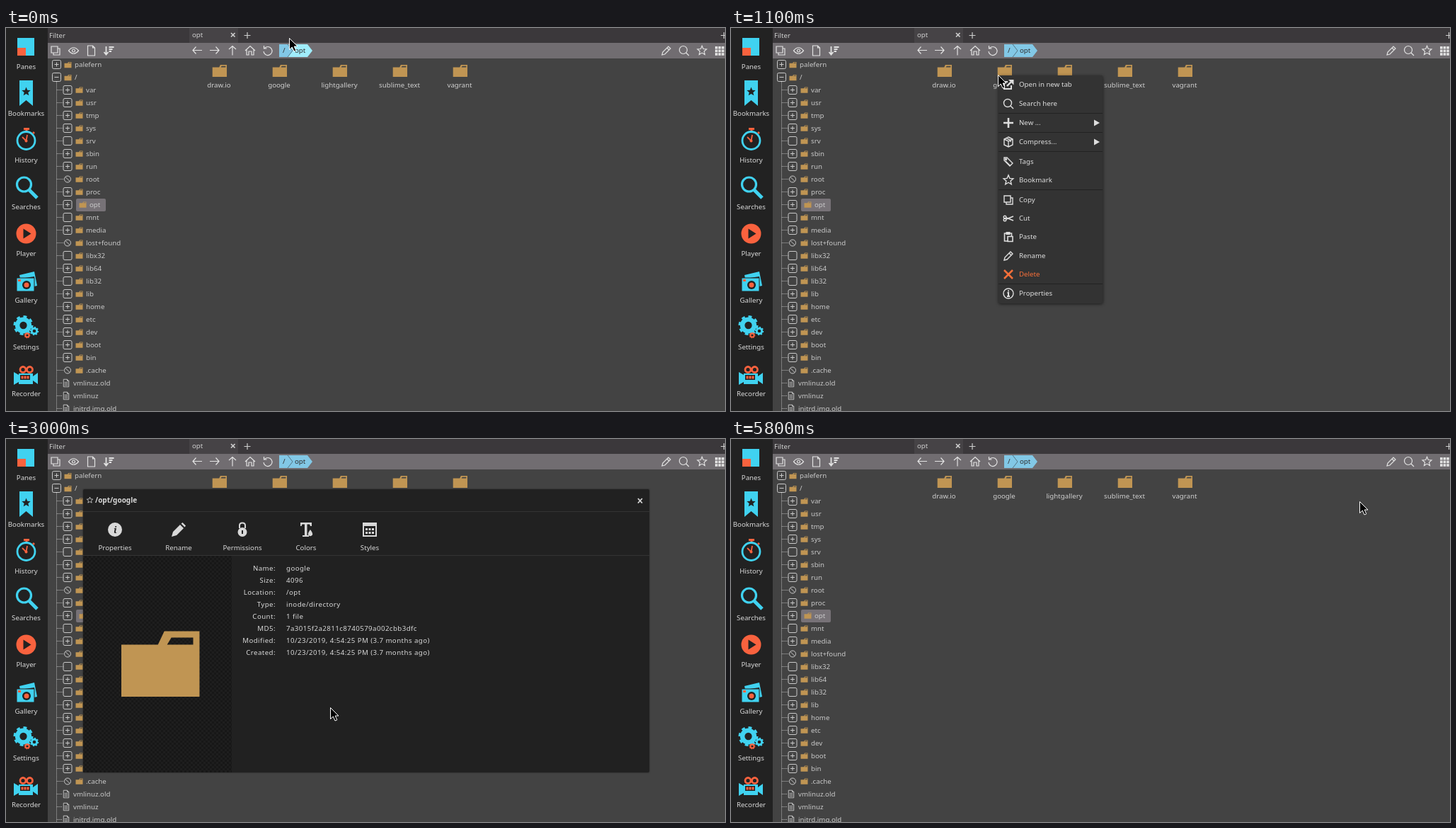
An HTML page for the animation above (6.4 s loop, 1016 by 541 pixels).

```html
<!DOCTYPE html>
<html lang="en">
<head>
<meta charset="utf-8">
<title>File manager</title>
<style>
html, body { margin: 0; width: 100%; height: 100%; overflow: hidden; background: #434343; }
svg { display: block; }
text { font: 9.7px "Noto Sans", "Open Sans", sans-serif; fill: currentColor; }
.mid { text-anchor: middle; }
.end { text-anchor: end; }
.wide text { letter-spacing: .43px; }
.ln { fill: none; stroke: currentColor; stroke-width: 1.2; }
.thin { stroke-width: 1; }
.solid { fill: currentColor; }
.row { color: #dedede; }
.row rect.bg { fill: none; }
.row.on { color: #fff; }
.row.on rect.bg { fill: #3c3c3c; }
.row.del { color: #f9703a; }
#menu .ln { stroke-width: 1.4; }
#sub { color: #d4d4d4; fill: #353535; }
#sub.on { color: #fff; fill: #3a3a3a; }
</style>
</head>
<body>
<svg id="stage" width="1016" height="541" viewBox="0 0 1016 541"></svg>
<script>
const BLUE = '#40d2f0', RED = '#f9623e', GOLD = '#c09553', DARK = '#222';

const text = (x, y, s, attr = '') => `<text x="${x}" y="${y}" ${attr}>${s}</text>`;
const mid = (x, y, s) => text(x, y, s, 'class="mid"');
const rect = (x, y, w, h, fill, attr = '') =>
  `<rect x="${x}" y="${y}" width="${w}" height="${h}" ${fill ? `fill="${fill}"` : ''} ${attr}/>`;
const circle = (x, y, r, attr) => `<circle cx="${x}" cy="${y}" r="${r}" ${attr}/>`;
const path = (d, attr = 'class="ln"') => `<path d="${d}" ${attr}/>`;
const at = (x, y, body, scale = 1) => `<g transform="translate(${x} ${y}) scale(${scale})">${body}</g>`;
const group = (attr, ...parts) => `<g ${attr}>${parts.join('')}</g>`;

const star = r => 'M' + Array.from({length: 10}, (_, i) => {
  const a = i * Math.PI / 5, q = i % 2 ? r * .45 : r;
  return `${(q * Math.sin(a)).toFixed(2)} ${(-q * Math.cos(a)).toFixed(2)}`;
}).join('L') + 'Z';

const gear = (x, y, r, color) =>
  circle(x, y, r * .62, `fill="none" stroke="${color}" stroke-width="${r * .48}"`) +
  circle(x, y, r * .9, `fill="none" stroke="${color}" stroke-width="${r * .28}" pathLength="16" stroke-dasharray="1"`);

const folder = (x, y, scale) => at(x, y,
  path('M0 19H52L61 0H111V93H0ZM71 9L65 19H102V9Z', `fill="${GOLD}" fill-rule="evenodd"`), scale);

const solid = 'class="solid"', thin = 'class="ln thin"';
const icons = {
  open: path('M-1-4H-6V6H4V1', 'class="ln" style="stroke-width:2"') +
    path('M-2 2L5-5', 'class="ln" style="stroke-width:2.4"') + path('M0-7H7.500V.5Z', solid),
  search: circle(-1, -1, 5.5, 'class="ln"') + path('M3 3L7 7'),
  plus: path('M-7 0H7M0-7V7', 'class="ln" style="stroke-width:2.6"'),
  cube: path('M0-7L6-4V4L0 7L-6 4V-4ZM-6-4L0-1L6-4M0-1V7M-3-5.5L3-2.5V0'),
  tag: path('M-6-6H-2L6 2L2 6L-6-2ZM-4-1L3 6') + circle(-3.5, -3.5, 1, 'class="ln"'),
  star: path(star(7.2)),
  copy: path('M-6-6H3V3H-6ZM-3 3V6H6V-3H3'),
  cut: path('M-3-1L7 3M-3 1L7-3', 'class="ln" style="stroke-width:1.8"') +
    circle(-5, -2, 1.8, 'class="ln"') + circle(-5, 2, 1.8, 'class="ln"'),
  paste: path('M0 6H-5.500V-5H4.500V-1M-1-.5H6V6.500H-1Z', 'class="ln" style="stroke-width:1.6"') + rect(-3.5, -7, 6, 4, '', solid),
  pencil: path('M-6 6L-5 2L3-6L6-3L-2 5ZM1-4L4-1'),
  cross: path('M-6-6L6 6M6-6L-6 6', 'class="ln" style="stroke-width:2.5"'),
  info: circle(0, 0, 7, 'class="ln"') + path('M-1.500-1H0V4M-2 4H2M0-4.500V-2.800', 'class="ln" style="stroke-width:2"'),
  arrow: path('M7 0H-6M-1.500-5L-6 0L-1.500 5'),
  eye: path('M-7 0Q0-8.500 7 0Q0 8.500-7 0Z') + circle(0, 0, 2, 'class="ln"'),
  page: path('M-5-7H2L5-4V7H-5ZM2-7V-4H5'),
  sort: path('M-4-6V5M-7 2L-4 5.500L-1 2M0-5H7M0-2H5M0 1H3.500', 'class="ln" style="stroke-width:1.8"'),
  home: path('M-7 0L0-6.500L7 0M-5-1.500V6H-2V1H2V6H5V-1.500'),
  reload: path('M-4.500-3.500A6 6 0 1 1-6 1M-5.500-7V-3H-1.500'),
  grid: [0, 1, 2, 3, 4, 5, 6, 7, 8].map(i => rect(-6 + i % 3 * 4.6, -6 + (i / 3 | 0) * 4.6, 3.6, 3.6, '', solid)).join('')
};
const icon = (name, x, y, scale) => at(x, y, icons[name], scale);

function sidebar() {
  const labels = ['Panes', 'Bookmarks', 'History', 'Searches', 'Player', 'Gallery', 'Settings', 'Recorder'];
  const b = `fill="${BLUE}"`, r = `fill="${RED}"`;
  const line = (color, w) => `fill="none" stroke="${color}" stroke-width="${w}"`;
  return rect(0, 0, 59, 541, DARK) + group('color="#dadada"',
    ...labels.map((s, i) => mid(28.5, 58 + 66 * i, s)),
    rect(16, 14, 24, 14, BLUE), rect(16, 28, 12, 11, RED), rect(28, 28, 12, 11, BLUE),
    path('M19 74H38V110L28.500 102L19 110Z', b), at(28.5, 90, path(star(6.5), `fill="${DARK}"`)),
    rect(25, 141, 8, 3, RED), rect(27.5, 143, 3, 3, RED), path('M38 147L40 149', line(RED, 2.5)),
    circle(28.5, 159, 12.5, line(BLUE, 2.8)), path('M23 154L28.500 159.500L30 151', line(RED, 1.8)), circle(28.5, 159.5, 2, r),
    circle(25.5, 221, 10, `fill="${DARK}" stroke="${BLUE}" stroke-width="3.200"`), path('M33 229L44 240', line(BLUE, 5)),
    circle(28.5, 290.5, 14, r), path('M24.500 283.500L35.500 290.500L24.500 297.500Z', `fill="${DARK}"`),
    path('M19 349L40 344L44 364L40 365V351L20 354Z', b),
    rect(15, 353, 25, 19, BLUE, `stroke="${DARK}"`),
    circle(29, 363, 6, `fill="${DARK}"`), circle(29, 363, 3.5, r), rect(17, 355, 4, 3, RED),
    gear(24.5, 420, 13.5, BLUE), gear(40, 428, 6, BLUE), gear(30, 434, 4.2, RED),
    circle(24, 482.5, 4, line(RED, 2.8)), circle(33.5, 482.5, 4, line(RED, 2.8)),
    rect(18, 488, 20, 15, BLUE), path('M11 486L18 490V500L11 504ZM38 492L45 487V503L38 498Z', b),
    rect(20, 490, 14, 7, DARK), ...[21.5, 25.5, 29.5].map(x => rect(x, 491.5, 3, 4, RED)));
}

function bars() {
  return rect(59, 0, 957, 21, '#3b383b') + rect(259, 0, 69, 21, '#464346') + rect(59, 21, 957, 22, '#716d71') +
    group('color="#cecece"',
      text(61, 14, 'Filter'), text(263, 13, 'opt'),
      path('M318 7L323.500 12.500M323.500 7L318 12.500', 'class="ln" style="stroke-width:1.700"'),
      path('M336.500 10.500H345.500M341 6V15M1010 10.500H1016M1014.500 6V15')) +
    group('color="#e2e2e2"',
      icon('copy', 70, 32), icon('eye', 95.5, 32), icon('page', 120.5, 32), icon('sort', 145.5, 32),
      icon('arrow', 270, 31.5), `<g transform="translate(295 31.500) scale(-1 1)">${icons.arrow}</g>`,
      `<g transform="translate(320 31.500) rotate(90)">${icons.arrow}</g>`,
      icon('home', 345, 32), icon('reload', 370, 32), icon('pencil', 933, 32),
      icon('search', 958, 32), icon('star', 983.5, 32, .95), icon('grid', 1008, 32)) +
    path('M386 23H398L405 32L398 41H386Z', 'fill="#82c8e6"') +
    path('M398 23H426L433 32L426 41H398L405 32Z', 'id="crumb"') +
    path('M398 23L405 32L398 41', 'fill="none" stroke="#56798a"') +
    group('color="#303030"', text(391, 35, '/'), text(408, 35, 'opt'));
}

function tree() {
  const dirs = '+var +usr +tmp +sys _srv +sbin +run !root +proc +opt _mnt +media !lost+found _libx32 +lib64 _lib32 +lib +home +etc +dev +boot +bin !.cache'.split(' ');
  const files = ['vmlinuz.old', 'vmlinuz', 'initrd.img.old'];
  const box = (x, y, kind) => kind === '!'
    ? circle(x, y, 4.5, thin) + path(`M${x - 3} ${y - 3}l6 6`, thin)
    : rect(x - 6, y - 6, 12, 12, '', 'rx="2" ' + thin) +
      (kind === '_' ? '' : path(`M${x - 3} ${y}h6` + (kind === '+' ? `M${x} ${y - 3}v6` : ''), thin));
  const dots = 'fill="none" stroke="#b5b5b5" stroke-dasharray="1 1"';
  const out = [path('M71.500 76V541', dots),
    box(71.5, 51.5, '+'), folder(82.5, 48, .09), text(97, 55, 'palefern'),
    box(71.5, 69.5, '-'), folder(82.5, 66, .09), text(97, 73, '/')];
  dirs.forEach((s, i) => {
    const y = 87.5 + 18 * i, name = s.slice(1), shift = name === 'opt' ? 5 : 0;
    if (shift) out.push(rect(99, y - 8.5, 42, 18, '#777277', 'rx="2"'));
    out.push(path(`M72 ${y}H81`, dots), box(87, y, s[0]), folder(98.5 + shift, y - 4, .09), text(113 + shift, y + 3.5, name));
  });
  files.forEach((s, i) => {
    const y = 501.5 + 18 * i;
    out.push(path(`M72 ${y}H80`, dots), icon('page', 85, y, .75),
      path(`M82.500 ${y - 1}h5m-5 2h5m-5 2h5`, 'class="ln" style="stroke-width:.8"'), text(95, y + 3.5, s));
  });
  return group('color="#cacaca"', ...out);
}

const centres = [80, 107, 134, 161, 189, 215, 243, 269, 295, 322, 348, 375];

function menu() {
  const items = [['open', 'Open in new tab'], ['search', 'Search here'], ['plus', 'New ...'], ['cube', 'Compress...'],
    ['tag', 'Tags'], ['star', 'Bookmark'], ['copy', 'Copy'], ['cut', 'Cut'], ['paste', 'Paste'],
    ['pencil', 'Rename'], ['cross', 'Delete'], ['info', 'Properties']];
  const rows = items.map(([name, label], i) => {
    const y = centres[i];
    return group(`class="row${name === 'cross' ? ' del' : ''}"`, rect(378, y - 13, 147, 26, '', 'class="bg"'),
      icon(name, 392, y), text(407, y + 3, label),
      i === 2 || i === 3 ? path(`M513 ${y - 4.5}L521 ${y}L513 ${y + 4.5}Z`, solid) : '');
  });
  const kinds = ['zip', 'tar', 'tar.gz', 'tar.bz2', 'rar', '7z'];
  return group('id="menu"',
    rect(378, 67, 147.5, 322, '#333', 'rx="3" style="filter:drop-shadow(0 1px 2px #0009)"'), ...rows,
    path('M378 120.500h147m-147 27h147m-147 27h147m-147 54h147m-147 133h147', 'stroke="#222"'),
    group('id="sub"', rect(525.5, 148, 69.5, 158),
      ...kinds.map((s, i) => {
        const y = Math.round(161.4 + 26.4 * i);
        return icon('cube', 539, y) + text(553, y + 3, s);
      })));
}

function dialog() {
  const tabs = ['Properties', 'Rename', 'Permissions', 'Colors', 'Styles'];
  const facts = [['Name', 'google'], ['Size', '4096'], ['Location', '/opt'], ['Type', 'inode/directory'], ['Count', '1 file'],
    ['MD5', '7a3015f2a2811c8740579a002cbb3dfc'], ['Modified', '10/23/2019, 4:54:25 PM (3.7 months ago)'],
    ['Created', '10/23/2019, 4:54:25 PM (3.7 months ago)']];
  return group('id="dialog" color="#d8d8d8"',
    rect(109, 71, 800, 400, '#212121', 'rx="2" style="filter:drop-shadow(0 0 1px #0008)"'),
    path('M109 102.500H909M109 164.500H909', 'stroke="#343434"'),
    rect(109, 165, 210, 306, 'url(#check)'),
    at(118.5, 86.5, path(star(4.5), 'class="ln" style="stroke-width:.8"')),
    text(126, 90, '/opt/google', 'style="font-weight:600;font-size:10px"'),
    rect(888, 76, 16, 21, '#393939', 'id="hot"'),
    path('M893 84L899 90.500M899 84L893 90.500', 'class="ln" style="stroke-width:1.800"'),
    ...tabs.map((s, i) => mid(154 + 90 * i, 157, s)),
    circle(154, 128, 10, solid), text(152, 133, 'i', 'style="font:italic 700 13px \'Noto Serif\',serif;fill:#222"'),
    path('M234 138L236 131L246 121L251 126L241 136ZM247.500 119.500L249.500 118L254 122.500L252.500 124.500Z', solid),
    path('M330 126V122Q330 118.500 334 118.500T338 122V126', 'class="ln" style="stroke-width:2"'),
    circle(334, 131.5, 6.5, solid), path('M334 129V134', 'stroke="#222" stroke-width="2"'),
    path('M416 118H432V123H430L429 120.500H425.500V136H428V138H419V136H422V120.500H418.500L417.500 123H416Z', solid),
    path('M430 128Q426 133 427 135.500Q430 139 433 135.500Q434 133 430 128Z', solid),
    path('M504 118H524V138H504ZM506 123V136H522V123Z', 'class="solid" fill-rule="evenodd"'),
    ...[0, 1, 2, 3, 4, 5].map(i => rect(508 + i % 3 * 4.5, 126 + (i / 3 | 0) * 5, 3, 3, '', solid)),
    folder(163, 271.5, .995),
    group('class="wide"', ...facts.map(([k, v], i) =>
      text(381, 186 + 17 * i, k + ':', 'class="end"') + text(396, 186 + 17 * i, v))));
}

const stage = document.getElementById('stage');
stage.innerHTML =
  `<defs><pattern id="check" width="6" height="6" patternUnits="userSpaceOnUse">
    ${rect(0, 0, 6, 6, '#1e1e1e')}${rect(0, 0, 3, 3, '#171717')}${rect(3, 3, 3, 3, '#171717')}</pattern></defs>` +
  rect(0, 0, 1016, 541, '#434343') + sidebar() + bars() + tree() +
  group('color="#cfcfcf"', ...['draw.io', 'google', 'lightgallery', 'sublime_text', 'vagrant'].map((s, i) =>
    folder(291.7 + 85 * i, 52, .183) + mid(301 + 85 * i, 84, s))) +
  rect(344, 43.5, 84.5, 64, 'none', 'id="cell" stroke="#7b7b7b"') + menu() + dialog() +
  path('M.5.5V16.500L4.300 13L7 19L9.800 17.800L7.200 12H12Z', 'id="cursor" fill="#000" stroke="#fff" stroke-linejoin="round"');

const $ = id => document.getElementById(id);
const [crumb, cell, menuBox, sub, dialogBox, hot, cursor] = ['crumb', 'cell', 'menu', 'sub', 'dialog', 'hot', 'cursor'].map($);
const rows = [...document.querySelectorAll('.row')];
const show = (el, on) => el.style.display = on ? '' : 'none';

// Cursor route: tick (100 ms), x, y
const route = [[0, 400, 14], [1, 396, 0], [2, 388, 18], [3, 381, 48], [4, 377, 66], [13, 377, 66], [14, 392, 95],
  [15, 422, 160], [16, 438, 193], [17, 446, 232], [18, 451, 264], [19, 453, 291], [20, 454, 313], [24, 458, 379],
  [41, 458, 379], [42, 530, 325], [43, 609, 257], [44, 609, 257], [47, 765, 153], [49, 850, 106], [51, 888, 88], [64, 888, 88]];

function place(tick) {
  const i = route.findIndex(p => p[0] > tick), [t0, x0, y0] = route[i - 1], [t1, x1, y1] = route[i];
  const k = (tick - t0) / (t1 - t0);
  return [x0 + (x1 - x0) * k, y0 + (y1 - y0) * k];
}

// Hover states trail the cursor by one tick.
function hovered(tick) {
  const y = place(Math.max(0, tick - 1))[1];
  return y < 67 ? -1 : centres.reduce((best, c, i) => Math.abs(c - y) < Math.abs(centres[best] - y) ? i : best, 0);
}

const start = performance.now();
function draw() {
  const tick = Math.floor((performance.now() - start) % 6400 / 100);
  const row = hovered(tick);
  cursor.setAttribute('transform', `translate(${place(tick).map(Math.round).join(' ')})`);
  crumb.setAttribute('fill', tick < 1 ? '#a0edfb' : '#82c8e6');
  show(cell, tick >= 8 && tick < 11);
  cell.style.opacity = Math.min(1, (tick - 7) / 3);
  show(menuBox, tick >= 11 && tick < 30);
  show(sub, tick >= 16);
  rows.forEach((el, i) => el.classList.toggle('on', i === row));
  sub.classList.toggle('on', row === 3);
  show(dialogBox, tick >= 30 && tick < 58);
  show(hot, tick >= 52);
  requestAnimationFrame(draw);
}
draw();
</script>
</body>
</html>
```
